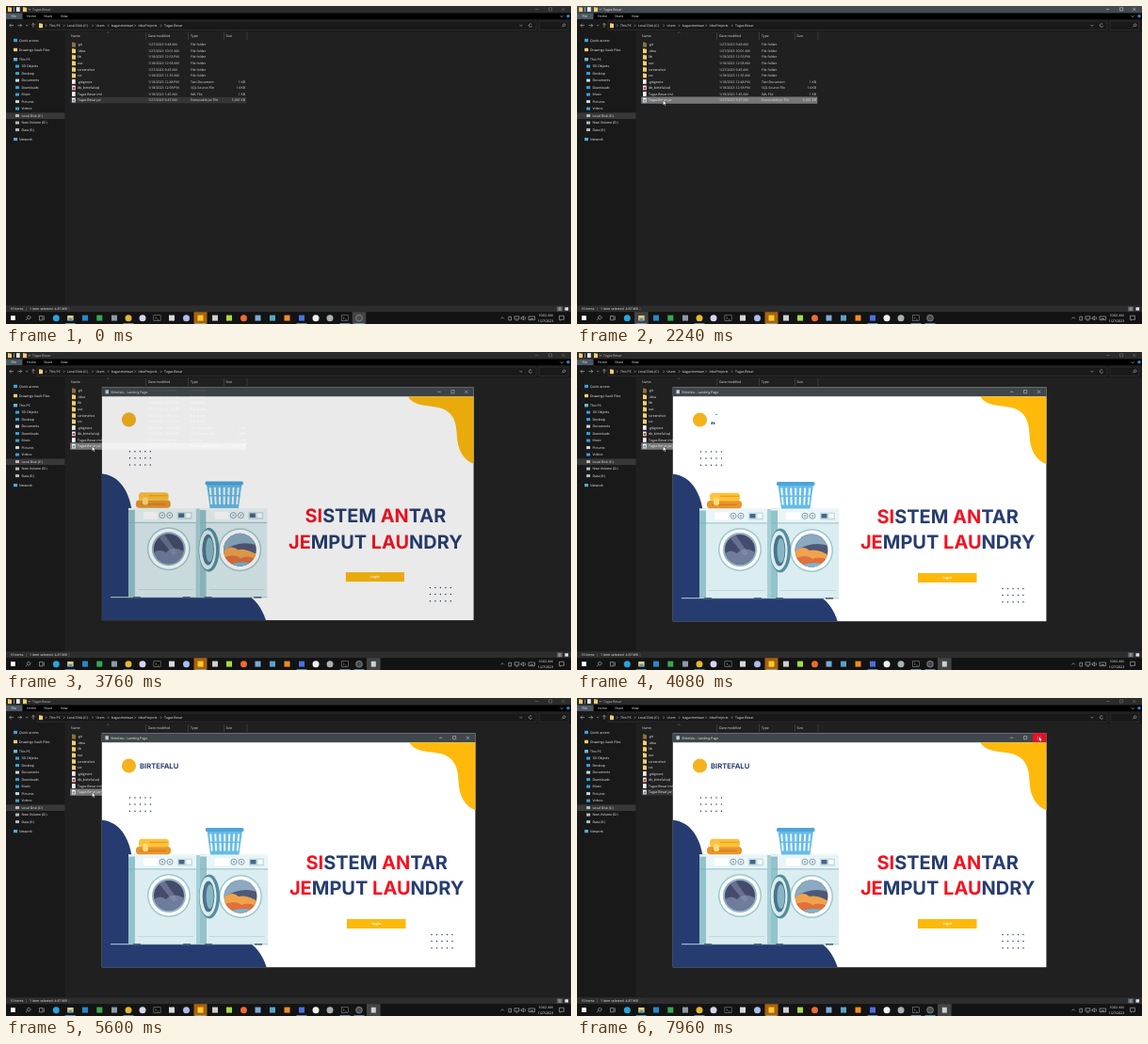
Write an HTML page that moves like this. It is 600 by 338 pixels and loops after 8000 ms.

```html
<!DOCTYPE html>
<html lang="en">
<head>
<meta charset="utf-8">
<title>Desktop</title>
<style>
html, body { margin: 0; width: 100%; height: 100%; overflow: hidden; background: #202020; }
svg { display: block; width: 100vw; height: 100vh; }
text { font-family: "Open Sans", "Noto Sans", sans-serif; font-size: 3.5px; fill: #f5f5f5; text-rendering: geometricPrecision; white-space: pre; }
.dim { fill: #e2e2e2; }
.bold { font-family: Inter, sans-serif; font-weight: 700; fill: #263c70; }
.line { fill: none; stroke: #ddd; stroke-width: .5; }
</style>
</head>
<body>
<svg viewBox="0 0 600 338">
  <defs>
    <clipPath id="page"><rect x="101.8" y="47.2" width="396.6" height="239"/></clipPath>
    <clipPath id="brandClip"><rect x="138" y="66" width="60" height="11"/></clipPath>
    <clipPath id="drum"><circle cx="249" cy="211" r="17.5"/></clipPath>
    <clipPath id="glass"><circle cx="173" cy="210" r="16"/></clipPath>
  </defs>

  <g id="explorer"></g>
  <g id="taskbar"></g>

  <g id="app">
    <rect x="101.8" y="37.4" width="396.6" height="248.8" fill="#fff"/>
    <rect x="101.8" y="37.4" width="396.6" height="9.8" fill="#3f474c"/>
    <rect id="close" x="483.8" y="37.4" width="14.6" height="9.8" fill="#e81123"/>
    <rect x="105.5" y="40.3" width="3.4" height="4" fill="#c9d2da"/>
    <text x="111.5" y="43.7">Birtefalu - Landing Page</text>
    <path class="line" d="M460 42.3h3.4M474.5 40.6h3.2v3.2h-3.2zM488.8 40.6l3.4 3.4m0-3.4l-3.4 3.4"/>
    <g id="content" clip-path="url(#page)">
      <path fill="#feb90b" d="M428 47C434 57 446 56.5 458 58.5C475 61 480 72 480.5 88C481 104 487 115 499 119.5V47z"/>
      <path fill="#263c70" d="M101 129.5C117 131 130 143 134 170C142 222 160 240 200 246C240 248 267 254 277 287H101z"/>
      <g id="dots" fill="#263c70"></g>
      <g id="laundry"></g>
      <circle cx="130.5" cy="72" r="7.6" fill="#f5b21c"/>
      <g clip-path="url(#brandClip)"><text id="brand" class="bold" x="142" y="75" style="font-size:7.6px">BIRTEFALU</text></g>
      <g id="headline"></g>
      <rect x="362" y="235" width="62.5" height="10" fill="#feb90b"/>
      <text x="393.2" y="241.3" text-anchor="middle" style="font-weight:700;fill:#fff">Login</text>
    </g>
  </g>

  <path id="cursor" d="M0 0V5.4L1.3 4.2L2.2 6.2L3.1 5.8L2.2 3.9H3.9z" fill="#fff" stroke="#111" stroke-width=".4"/>
</svg>

<script>
const $ = id => document.getElementById(id);
const rect = (x, y, w, h, fill, extra = '') => `<rect x="${x}" y="${y}" width="${w}" height="${h}" fill="${fill}" ${extra}/>`;
const circle = (x, y, r, fill, extra = '') => `<circle cx="${x}" cy="${y}" r="${r}" fill="${fill}" ${extra}/>`;
const label = (x, y, s, extra = '') => `<text x="${x}" y="${y + 1.25}" ${extra}>${s}</text>`;
const line = (d, extra = '') => `<path class="line" d="${d}" ${extra}/>`;
const folder = (x, y, fill = '#f3cf70') => rect(x, y - 2.4, 2.2, 1, '#d9a63a') + rect(x, y - 1.9, 4, 4.4, fill);
const sheet = (x, y, mark) => rect(x, y - 2.4, 3.7, 4.8, '#f2f2f2') + (mark ? rect(x + .6, y - .7, 2.4, 2.2, mark) : '');

function explorer() {
  let s = rect(0, 0, 600, 325, '#202020') + rect(0, 0, 600, 14, '#000') +
    rect(0, 0, 600, 7.5, '#2b2b2b', 'id="titleBar"') +
    rect(0, 7.5, 17.5, 6.5, '#4c5863') + rect(0, 14, 600, 13, '#191919') + rect(0, 27, 62.5, 291, '#191919');
  s += folder(2, 3.6) + line('M8.5 1.5v4.5M23.5 3l1.3 1.3l1.3-1.3') + sheet(11, 3.6) + folder(18, 3.6) + label(28, 3.8, 'Tugas Besar', 'id="titleText"');
  s += line('M562 3.5h3.4M576.5 1.8h3.2v3.2h-3.2zM590 1.8l3.4 3.4m0-3.4l-3.4 3.4', 'id="controls"') + line('M588.5 10.3l1.6 1.6l1.6-1.6');
  s += circle(597, 10.8, 1.8, '#2b82d0');
  [[5.5, 'File'], [22, 'Home'], [40, 'Share'], [58, 'View']].forEach(([x, n]) => s += label(x, 11, n));

  s += rect(33, 16, 530, 9.2, '#191919', 'stroke="#474747" stroke-width=".4"') + rect(566, 16, 31, 9.2, '#191919', 'stroke="#474747" stroke-width=".4"');
  s += line('M8 20.6H3.8m1.8-1.8l-1.8 1.8l1.8 1.8M29 22.8v-4.4m-1.8 1.8l1.8-1.8l1.8 1.8M21 20l1.2 1.2l1.2-1.2M545.5 20l1.4 1.4l1.4-1.4');
  s += line('M12.5 20.6h4.2m-1.8-1.8l1.8 1.8l-1.8 1.8');
  s += line('M558.3 19.5a1.7 1.7 0 1 0 .3 1.6M590.4 22.3l1.3-1.3a1.3 1.3 0 1 1 .2.2');
  s += folder(35, 20.7);
  [[46, 'This PC'], [65, 'Local Disk (C:)'], [95.5, 'Users'], [112, 'bagasmerwan'], [140.5, 'IdeaProjects'], [168, 'Tugas Besar']]
    .forEach(([x, n]) => s += label(x, 20.7, n) + line(`M${x - 4} 19.6l1.1 1.1l-1.1 1.1`));

  s += rect(0, 113.4, 62.5, 6.7, '#383838');
  const blue = '#3aa0d8';
  [[36.6, 'Quick access', blue], [46.6, 'Drawings Vault Files', '#f3cf70'], [56.8, 'This PC', '#66b7dd']]
    .forEach(([y, n, c]) => s += rect(8, y - 1.8, 4, 3.4, c) + label(14, y, n));
  ['3D Objects', 'Desktop', 'Documents', 'Downloads', 'Music', 'Pictures', 'Videos', 'Local Disk (C:)', 'New Volume (D:)', 'Data (E:)']
    .forEach((n, i) => {
      const y = 64.1 + i * 7.5;
      s += rect(10, y - 1.5, 4, 3, i > 6 ? '#b4bcc2' : i == 2 || i == 5 ? '#c5d9e3' : blue) + label(16.5, y, n);
    });
  s += rect(8, 140, 4, 3.2, '#55a9d6') + label(14, 141.6, 'Network');

  [[69, 'Name'], [151, 'Date modified'], [196, 'Type'], [233.5, 'Size']].forEach(([x, n]) => s += label(x, 32, n, 'class="dim"'));
  s += line('M148.5 28v8M193.5 28v8M231.5 28v8M256 28v8', 'style="stroke:#555"') + line('M107 28.8l1.2-1.1l1.2 1.1', 'style="stroke:#888"');
  s += rect(68.5, 96.9, 186.5, 6.5, '#383838', 'id="row" stroke-width=".4"');
  const dir = 'File folder';
  [['.git', '27/2023 9:48', dir], ['.idea', '27/2023 10:01', dir], ['lib', '18/2023 12:53', dir, 'P'], ['out', '18/2023 12:58', dir],
   ['screenshot', '27/2023 9:45', dir], ['src', '18/2023 11:35', dir], ['.gitignore', '18/2023 12:48', 'Text Document', 'P', '1 KB'],
   ['db_birtefal.sql', '18/2023 12:58', 'SQL Source File', 'P', '14 KB'], ['Tugas Besar.iml', '18/2023 1:45', 'IML File', '', '1 KB'],
   ['Tugas Besar.jar', '27/2023 9:47', 'Executable Jar File', '', '5,001 KB']]
    .forEach(([name, date, type, half, size = ''], i) => {
      const y = 41.1 + i * 6.55;
      s += type == dir ? folder(70, y, i ? undefined : '#86743f') : sheet(70, y, ['', '#c33', '', '#6c8fae'][i - 6]);
      s += label(76, y, name) + label(151, y, `1/${date} ${half || 'A'}M`, 'class="dim"') +
        label(196, y, type, 'class="dim"') + label(254, y, size, 'class="dim" text-anchor="end"');
    });

  s += rect(0, 318.5, 600, 6.8, '#2d2d2d') + label(4.5, 322, '10 items') + label(25, 322, '1 item selected  4.87 MB') +
    line('M21.5 320v4M67 320v4', 'style="stroke:#666"');
  return s + rect(585, 319.4, 6, 5, '#505a62') + line('M586.5 320.8h3M586.5 322h3M586.5 323.2h3') + rect(593.5, 320.3, 3.6, 3.3, '#e4e4e4');
}

function taskbar() {
  let s = rect(0, 325.2, 600, 12.8, '#131313');
  const lit = (id, x) => rect(x - 7.3, 325.2, 14.6, 12.8, '#444', `id="${id}"`);
  s += lit('litFiles', 68.3) + lit('litRecorder', 375) + rect(199.5, 325.2, 14, 12.8, '#a8620e');
  s += rect(5, 329.2, 4.8, 4.8, '#fff') + line('M21 334l1.8-1.8a1.8 1.8 0 1 1 .3.3M35.5 329.5h3.4v4.4h-3.4zM40.3 329.5v4.4');
  s += rect(65.2, 329, 6.4, 5.4, '#f3cf70') + rect(66.4, 331.6, 4, 2.8, '#3c9ad8');
  const round = { 53.3: '#2ba3dc', 130: '#e5b833', 145: '#d8d4ef', 191.5: '#a9bdf0', 252.5: '#f06a36', 329: '#f1f1f1', 344: '#a9b0b4' };
  const square = { 84: '#2489ca', 99.3: '#36a852', 115: '#8c9aa5', 176: '#d9d9d9', 206.5: '#ffc928', 222: '#cfcfcf', 237: '#a6db45',
    267.5: '#7ea8d6', 283: '#55a5c9', 298.5: '#f58a27', 314: '#4b6fe0' };
  for (const x in round) s += circle(x, 331.7, 3.5, round[x]);
  for (const x in square) s += rect(x - 3, 328.6, 6, 6, square[x]);
  for (const x of [160.5, 360]) s += rect(x - 3.6, 328.8, 7.2, 5.8, '#080808', 'stroke="#aaa" stroke-width=".5"') + line(`M${x - 2} 330.4l1.3 1.2l-1.3 1.2m2.2.3h1.7`);
  s += circle(375, 331.7, 3.4, '#484b50', 'stroke="#a8a8a8" stroke-width=".6"');
  s += `<g id="appButton">${lit('litApp', 390.3)}${rect(387.8, 328.8, 5, 5.8, '#cbd3d9')}</g>`;
  for (const x of [68.3, 130, 206.5, 314, 360, 375]) s += rect(x - 5.5, 337.3, 11, .7, '#77b5e0');
  s += line('M525.5 332.4l1.7-1.7l1.7 1.7M533.8 330.2h2.7v3.8h-2.7zM540 329.8h4.8v3.2H540zM541.5 334.2h2M547 331h1.2l1.4-1.4v4.4l-1.4-1.4H547zM551 330.2q1.3 1.6 0 3.2M555 330h6.5v3.7H555zM556.5 332.5h3.5M587.5 329.3h5v4h-3l-1 1v-1h-1z');
  return s + label(573, 328.9, '10:02 AM', 'text-anchor="middle"') + label(573, 334.7, '1/27/2023', 'text-anchor="middle"');
}

function machine(x) {
  let s = rect(x, 166.5, 72, 95, '#dbedf0') + rect(x, 166.5, 7, 95, '#92c2ca') + rect(x, 166.5, 72, 2, '#eef8f9') +
    rect(x + 7, 168.5, 65, 13, '#eaf5f7') + rect(x, 181.5, 72, .8, '#82b4bf') + rect(x + 16, 170.3, 15, 8, '#fff', 'rx="1"');
  for (const dx of [36, 44]) s += circle(x + dx, 174.2, 3, '#fff', 'stroke="#6b8fa8" stroke-width=".9"') + circle(x + dx, 174.2, 1.2, '#8fb3c2');
  s += rect(x + 52, 170.5, 16, 8, '#c3dfe5') + rect(x + 53.5, 172, 6, 4.5, '#48648a') + rect(x + 61.5, 172, 5, 4.5, '#fff');
  return s + rect(x + 10, 253, 59, .7, '#b2d2d9') + rect(x + 5, 261, 8, 1.6, '#426779') + rect(x + 58, 261, 8, 1.6, '#426779');
}

function laundry() {
  let s = rect(111, 261, 167, 1.2, '#9bb9cc') + rect(201, 167, 6, 94.5, '#a6cfd6') + machine(130) + machine(206);
  s += circle(173, 210, 23, '#9cc8d0') + circle(173, 210, 21.5, '#fff') + circle(173, 210, 18, '#8fb4c4') + circle(173, 210, 16, '#454b6c');
  s += `<g clip-path="url(#glass)"><path fill="#6f7c9c" d="M155 216q8-8 15-2q8-9 21 0v14h-36z"/><path fill="#8b96b2" d="M163 198l5-4l14 20l-4 3z" opacity=".5"/></g>`;
  s += circle(249, 211, 23, '#9cc8d0') + circle(249, 211, 21.5, '#fff') + circle(249, 211, 17.5, '#4f5878');
  s += `<g clip-path="url(#drum)"><path fill="#8ba9c0" d="M231 193h36v13q-18-6-36 6z"/><path fill="#f0a34d" d="M229 214q10-10 18-3q9-2 22 6v14h-40z"/><path fill="#e0703d" d="M230 220q13-6 20 0q8-4 18 2v10h-38z"/><path fill="#71b9d9" d="M238 227q10-5 25-1v6h-25z"/></g>`;
  s += `<ellipse cx="216" cy="211" rx="11" ry="23.5" fill="#568e9c"/><ellipse cx="214.5" cy="211" rx="9" ry="21" fill="#d9eef1"/><ellipse cx="215" cy="211" rx="6.3" ry="16.5" fill="#4b7389"/><ellipse cx="216.5" cy="211" rx="4" ry="13" fill="#86b5c4"/>`;
  s += rect(138, 158, 37, 8.2, '#e8952a', 'rx="3.5"') + rect(141, 149.7, 32, 8.8, '#fec23b', 'rx="3.5"') +
    rect(152, 152.8, 20, 1, '#e89b16') + rect(143, 161.8, 27, 1, '#c97a1c') + rect(145, 155, 6, 8, '#ffda78', 'rx="2"');
  s += '<path fill="#66bbe6" d="M213.5 141H251L247.5 166.5H217z"/>' + rect(212, 138, 40.5, 4, '#4da5d8', 'rx="1.5"');
  for (let i = 0; i < 7; i++) {
    const x = 217.2 + i * 5, lean = (232.3 - x) * .1;
    s += `<path d="M${x} 144.5l${lean} 18" stroke="#eef9fe" stroke-width="2"/>`;
  }
  return s + rect(215.5, 152.5, 33.5, 1.4, '#66bbe6');
}

function headline() {
  const row = (y, parts) => `<text class="bold" x="393.7" y="${y}" text-anchor="middle" style="font-size:20px">` +
    parts.map((p, i) => `<tspan${i % 2 ? '' : ' fill="#f51220"'}>${p}</tspan>`).join('') + '</text>';
  return row(181.5, ['SI', 'STEM ', 'AN', 'TAR']) + row(209.3, ['JE', 'MPUT ', 'LAU', 'NDRY']);
}

$('explorer').innerHTML = explorer();
$('taskbar').innerHTML = taskbar();
$('laundry').innerHTML = laundry();
$('headline').innerHTML = headline();
for (const [x, y] of [[131.5, 106], [452, 251.5]])
  for (let i = 0; i < 15; i++) $('dots').innerHTML += circle(x + i % 5 * 5.5, y + (i / 5 | 0) * 7.1, .75, '#263c70');

const show = (id, on) => $(id).style.display = on ? '' : 'none';
const clamp = v => Math.min(1, Math.max(0, v));
const ease = p => p * p * (3 - 2 * p);

const stops = [[200, 250, 215], [760, 91.3, 100], [5880, 91.3, 100], [6360, 158, 89.6], [6700, 158, 89.6], [7480, 490.5, 41]];
function pointer(t) {
  let [, x, y] = stops[0];
  for (let i = 1; i < stops.length; i++) {
    const [t0, x0, y0] = stops[i - 1], [t1, x1, y1] = stops[i];
    if (t < t0) break;
    const p = ease(clamp((t - t0) / (t1 - t0)));
    x = x0 + (x1 - x0) * p;
    y = y0 + (y1 - y0) * p;
  }
  return [x, y];
}

// Letters slide in one by one; in each four the first rises and the last lags.
function brandOffsets(t) {
  let last = 0;
  return Array.from({ length: 9 }, (_, i) => {
    const lag = i % 4 == 3 ? 140 : 0;
    const p = clamp((t - 3930 - i * 78 - lag) / 320);
    const y = (i % 4 == 0 ? 1 : -1) * 12 * (1 - p) ** 1.5;
    const step = y - last;
    last = y;
    return step.toFixed(2);
  }).join(' ');
}

function draw(t) {
  const opened = t >= 3540, focused = t >= 720 && !opened;
  const [x, y] = pointer(t);
  const hover = t > 200 && x > 68 && x < 102 && y > 96.9 && y < 103.4;
  $('titleBar').setAttribute('fill', focused ? '#434b50' : '#2b2b2b');
  $('titleText').setAttribute('opacity', focused ? 1 : .75);
  $('controls').setAttribute('opacity', focused ? 1 : .45);
  show('litFiles', focused);
  show('litRecorder', t < 720);
  show('appButton', opened);
  $('row').setAttribute('fill', hover ? '#777' : '#363636');
  $('row').setAttribute('stroke', hover ? '#969696' : 'none');

  const rest = t > 4000 ? 0 : Math.exp(-.0107 * (t - 3540));
  const scale = 1 - .051 * rest;
  show('app', opened);
  $('app').setAttribute('opacity', clamp(1 - rest));
  $('app').setAttribute('transform', `translate(125 55) scale(${scale}) translate(-125 -55)`);
  show('content', t >= 3660);
  show('close', x > 483.5 && x < 498 && y > 37.5 && y < 47);
  $('brand').setAttribute('dy', brandOffsets(t));

  show('cursor', t > 200);
  $('cursor').setAttribute('transform', `translate(${x} ${y})`);
}

let start;
function tick(now) {
  start ??= now;
  draw((now - start) % 8000);
  requestAnimationFrame(tick);
}
draw(0);
requestAnimationFrame(tick);
</script>
</body>
</html>
```
